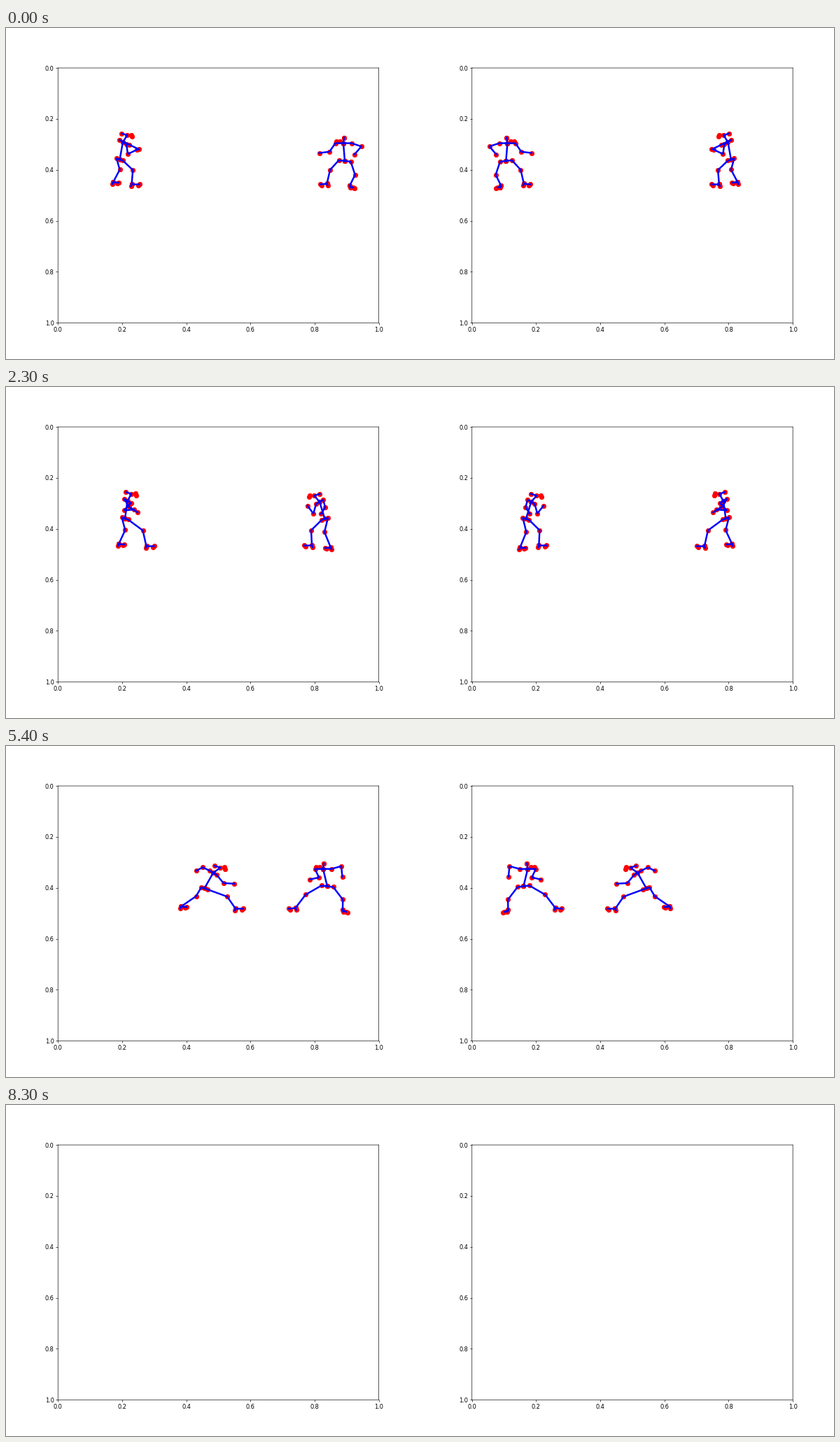
Animation, 1183 px wide and 473 px high, one loop 8.4 s. Source, as a matplotlib script:

```python
import numpy as np
import matplotlib.pyplot as plt
from matplotlib.animation import FuncAnimation

W, H, DPI = 1183, 473, 59.15
FRAMES, STEP = 84, 100
NUDGE = 0.3  # the axes sit a fraction of a pixel right and down
AX_W, AX_H = 0.3875 * W, 0.77 * H
AX_X, AX_Y = 0.0625 * W + NUDGE, 0.12 * H + NUDGE
TORSO, ARM = 25.5, 15.5

# Offsets of body parts seen side-on and from the front, in pixels, x forward
LOOK = {
    "shoulder": [(5, 3), (11.5, 0)],
    "hip": [(4.5, 1.5), (8.5, -1)],
    "ear": [(-8, -2.5), (0, 0)],
    "eye_near": [(6, -0.5), (6, 5)],
    "eye_far": [(7, 2), (11, 5)],
    "front_knee": [(8, -3.5), (4, -3)],
    "rear_knee": [(7, -1), (-7, 1.5)],
    "front_toe": [(11, 0), (9.5, 1)],
    "rear_toe": [(8, 0.5), (-5, 2.5)],
    "fold": [(0.9, 0.4), (0.8, 0.95)],  # elbow bend of front and rear arm
}


def stance(hip, lean, feet, front_hand, rear_hand, side=1):
    """Feet are measured forward from the hip, hands from the neck."""
    return np.array([*hip, lean, *feet, *front_hand, *rear_hand, side], float)


def move(pose, dx):
    return pose + dx * (np.arange(len(pose)) == 0)


guard_l = stance((162.5, 188), 4.5, (17, -9.5), (20, 11), (23, 10.5))
lunge_l = stance((192, 202.5), 21, (52, -32), (21, 26), (-19, -2.5))
walk_l = stance((170, 188), 3.5, (30.5, -9), (9.5, 12.5), (14.5, 16.5))
press_l = stance((231.5, 199), 10.5, (42, -30.5), (21, 12), (-2, -12.5))
reach_l = stance((283.5, 203.5), 12.5, (44.5, -33.5), (30, 15.5), (-24.5, -3))
back_l = stance((217, 189.5), 14, (19, -8.5), (35.5, 14), (7.5, 14))

guard_r = stance((484, 190), 2, (25.5, -7), (34.5, 14), (-16, 16), 0)
lunge_r = stance((325, 208), 22, (-44, -51), (40, 5), (-35.5, -15))
walk_r = stance((455.5, 188.5), 7.5, (18.5, -8.5), (17.5, 5.5), (-2, 17))
press_r = stance((424, 197.5), 5, (28, -17), (35.5, 9), (-22.5, 15), 0)
reach_r = stance((459, 200.5), 6, (45.5, -22), (19, 15), (-27.5, 11), 0)
back_r = stance((427, 196), 2, (40.5, -16), (28, 9.5), (-17.5, 21), 0)

# time, floor height, left fencer, right fencer
KEYS = [(0, 223, guard_l, guard_r),
        (900, 226, lunge_l, lunge_r),
        (1800, 227, move(walk_l, -7.5), move(walk_r, 5)),
        (2300, 227, walk_l, walk_r),
        (4300, 234, press_l, press_r),
        (5400, 232, reach_l, reach_r),
        (6300, 228, back_l, back_r),
        (7200, 228, move(back_l, -74), move(back_r, 40)),
        (8200, 223, move(guard_l, 2), guard_r)]


def elbow(shoulder, wrist, fold):
    dx, dy = wrist - shoulder
    reach = np.hypot(dx, dy)
    bend = fold * np.sqrt(max(0, ARM ** 2 - reach ** 2 / 4))
    return (shoulder + wrist) / 2 + bend * np.array([-dy, dx]) / reach


def build(pose, floor, facing):
    """Linked chains of joints and the loose dots of one fencer."""
    hip_x, hip_y, lean = pose[:3]
    feet, hands, side = pose[3:5], pose[5:9].reshape(2, 2), pose[9]

    def look(part):
        seen_side, seen_front = np.array(LOOK[part], float)
        return seen_front + (seen_side - seen_front) * side

    hip = np.zeros(2)
    neck = np.array([lean, -np.sqrt(TORSO ** 2 - lean ** 2)])
    profile = np.array([4 + 0.5 * lean, -11 + 0.28 * lean])
    head = neck + side * profile + (1 - side) * np.array([-1, -8])
    chains = [[head + look("ear"), head, neck, hip]]
    loose = [head + look("eye_near"), head + look("eye_far")]

    for i, (name, sign) in enumerate((("front", 1), ("rear", -1))):
        shoulder = neck + sign * look("shoulder")
        wrist = neck + hands[i]
        bent = elbow(shoulder, wrist, look("fold")[i])
        chains.append([neck, shoulder, bent, wrist])

        joint = sign * look("hip")
        ankle = np.array([feet[i], floor + (1.5 * sign - 1) * facing - hip_y])
        knee = (joint + ankle) / 2 + look(name + "_knee")
        toe = ankle + look(name + "_toe")
        chains += [[hip, joint, knee, ankle, ankle + (-1, 2.5)], [ankle, toe]]
        loose.append(toe + (-2, 1.2))

    place = lambda pts: np.array(pts) * (facing, 1) + (hip_x, hip_y)
    return [place(c) for c in chains], place(loose)


TIMES = [key[0] for key in KEYS]
FLOORS = [key[1] for key in KEYS]
TRACKS = [np.array([key[i] for key in KEYS]) for i in (2, 3)]


def figures_at(t):
    floor = np.interp(t, TIMES, FLOORS)
    for track, facing in zip(TRACKS, (1, -1)):
        pose = np.array([np.interp(t, TIMES, column) for column in track.T])
        yield build(pose, floor, facing)


def to_axes(pts):
    return (pts - (AX_X, AX_Y)) / (AX_W, AX_H)


def mirror(pts):
    return pts * (-1, 1) + (1, 0)


# A hair over whole pixels so that rounding never drops one
fig = plt.figure(figsize=((W + 0.01) / DPI, (H + 0.01) / DPI), dpi=DPI,
                 facecolor="white")
panels = []
for left in (0.0625, 0.5625):
    ax = fig.add_axes([left + NUDGE / W, 0.11 - NUDGE / H, 0.3875, 0.77])
    ax.set(xlim=(0, 1), ylim=(1, 0),
           xticks=np.linspace(0, 1, 6), yticks=np.linspace(0, 1, 6))
    for spine in ax.spines.values():
        spine.set_snap(False)
    dots = ax.scatter([], [], s=60, color="red")
    bones, = ax.plot([], [], color="blue", lw=3)
    panels.append((dots, bones))


def draw(frame):
    points, lines = [np.empty((0, 2))], [np.empty((0, 2))]
    if frame < FRAMES - 1:
        for chains, loose in figures_at(frame * STEP):
            points += chains + [loose]
            for chain in chains:
                lines += [chain, np.full((1, 2), np.nan)]
    points, lines = to_axes(np.vstack(points)), to_axes(np.vstack(lines))
    for (dots, bones), place in zip(panels, (np.array, mirror)):
        dots.set_offsets(place(points))
        bones.set_data(*place(lines).T)
    return [artist for panel in panels for artist in panel]


anim = FuncAnimation(fig, draw, frames=FRAMES, interval=STEP,
                     init_func=lambda: draw(0), repeat=True)
plt.show()
```
